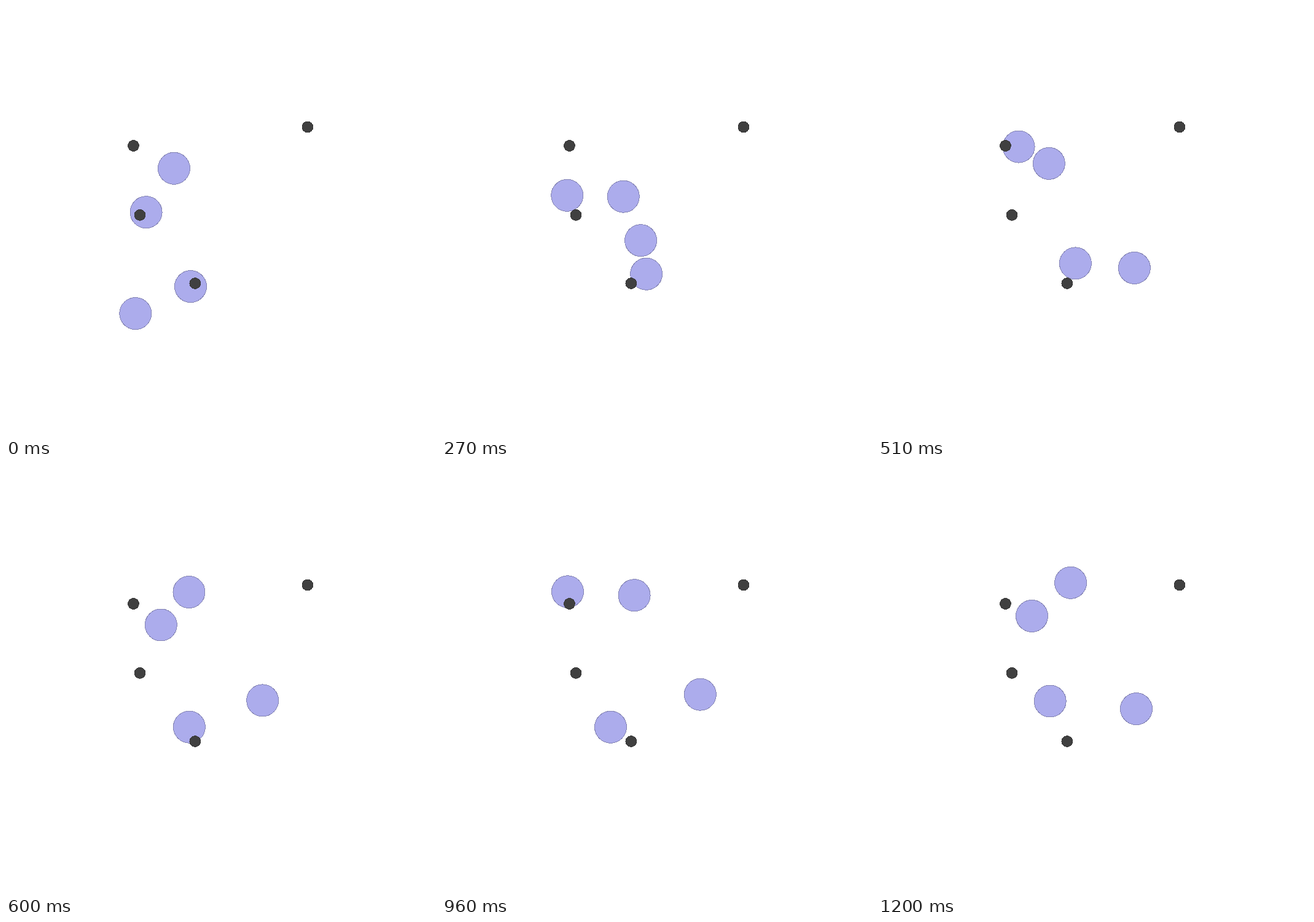
Write an HTML page that moves like this. It is 700 by 700 pixels and loops after 1.23 s.

```html
<!DOCTYPE html>
<html lang="en">
<head>
<meta charset="utf-8">
<title>Particles</title>
<style>
  html, body { margin: 0; width: 100%; height: 100%; overflow: hidden; background: #fff; }
  svg { display: block; width: 100vw; height: 100vh; }
  circle { stroke-width: 1; shape-rendering: crispEdges; }
  .agent { fill: #acacec; stroke: #8484b4; }
  .mark { fill: #404040; stroke: #383838; }
</style>
</head>
<body>
<svg viewBox="0 0 700 700"></svg>
<script>
const STEP = 30, STEPS = 41;
const svg = document.querySelector('svg');

// Each agent passes through its waypoints at these steps.
const keys = [0, 5, 14, 20, 26, 32, 40];
const paths = [
  [[273.5, 264.3], [315.3, 299.8], [266.1, 302.3], [298, 208.5], [311, 213.7], [313.1, 213.7], [313.6, 193.3]],
  [[228.1, 335.7], [299, 360], [335.2, 407.5], [298.4, 428.2], [261, 445.4], [274.5, 428.3], [280.2, 386]],
  [[300.5, 456.6], [280.4, 412.4], [405.2, 463.8], [417.7, 384.9], [420, 408.2], [420.4, 375.2], [420.5, 398.6]],
  [[210.8, 500.6], [210.8, 405.6], [202.2, 210.9], [252.3, 262], [205.5, 214.2], [204.5, 207.8], [250.5, 247.4]]
];
const marks = [[207.5, 227.5], [218, 340.3], [307.8, 451.5], [490.9, 197]];

function circle(kind, r, [x, y]) {
  const el = document.createElementNS('http://www.w3.org/2000/svg', 'circle');
  el.setAttribute('class', kind);
  el.setAttribute('r', r);
  place(el, x, y);
  svg.append(el);
  return el;
}

function place(el, x, y) {
  el.setAttribute('cx', x);
  el.setAttribute('cy', y);
}

// Agents start at rest; later slopes follow the neighbouring waypoints.
function slope(path, i, axis) {
  if (i === 0) return 0;
  const next = Math.min(i + 1, keys.length - 1);
  return (path[next][axis] - path[i - 1][axis]) / (keys[next] - keys[i - 1]);
}

// Cubic Hermite curve through the waypoints.
function at(path, step, axis) {
  const i = Math.max(0, keys.findIndex(k => k >= step) - 1);
  const span = keys[i + 1] - keys[i];
  const u = (step - keys[i]) / span, v = 1 - u;
  return v * v * (1 + 2 * u) * path[i][axis] + u * u * (1 + 2 * v) * path[i + 1][axis]
    + span * u * v * (v * slope(path, i, axis) - u * slope(path, i + 1, axis));
}

const agents = paths.map(path => circle('agent', 26, path[0]));
marks.forEach(point => circle('mark', 8.9, point));

const start = performance.now();
function draw(now) {
  const step = Math.floor(Math.max(0, now - start) / STEP) % STEPS;
  agents.forEach((el, i) => place(el, at(paths[i], step, 0), at(paths[i], step, 1)));
  requestAnimationFrame(draw);
}
draw(start);
</script>
</body>
</html>
```
